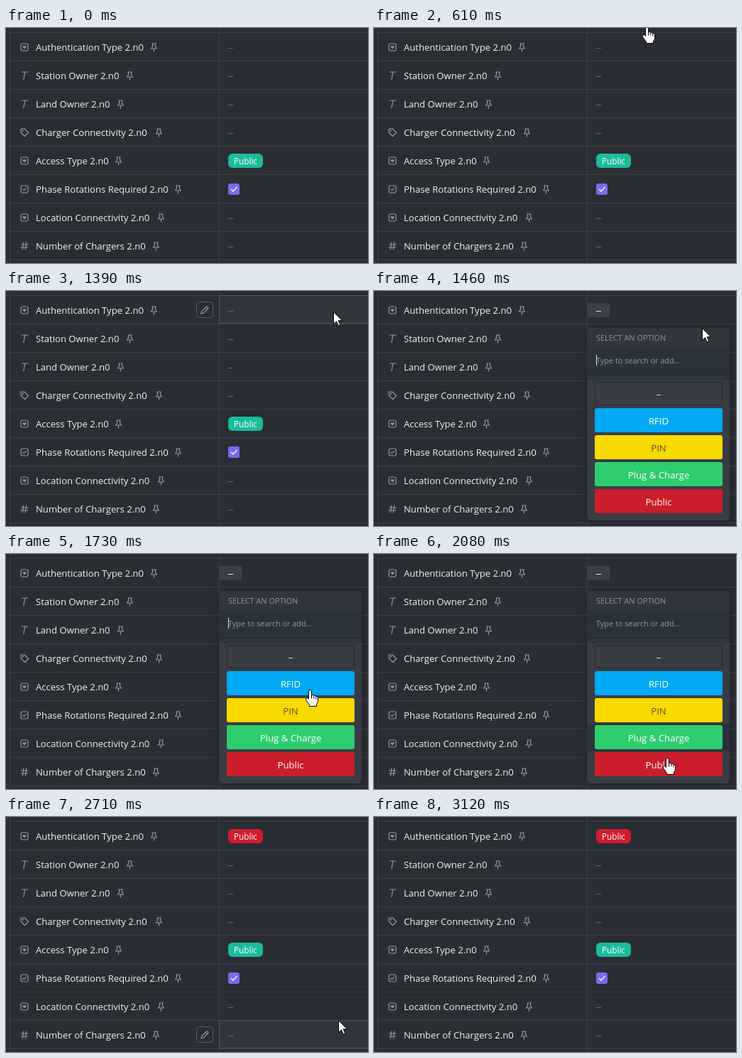
Recreate the animation shown at these times as an HTML page. Size 510 by 331 pixels, loop 4.13 s.

```html
<!DOCTYPE html>
<html lang="en">
<head>
<meta charset="utf-8">
<title>Custom fields</title>
<style>
  html, body { margin: 0; width: 100%; height: 100%; overflow: hidden; background: #2a2d34; }
  svg { display: block; font: 13.1px "Open Sans", "Noto Sans", sans-serif; }
  .line { fill: none; stroke: #979aa1; stroke-width: 1.2; stroke-linejoin: round; stroke-linecap: round; }
  .small { font-size: 10.9px; fill: #92969c; }
  .option { font-size: 13.2px; text-anchor: middle; }
  .pill { font-size: 11.7px; font-weight: 500; fill: #fff; text-anchor: middle; }
  .cursor { fill: #fff; stroke: #000; stroke-width: 1; stroke-linejoin: round; }
  .panel { filter: drop-shadow(0 1px 5px rgba(0, 0, 0, .3)); }
</style>
</head>
<body>
<svg id="stage" width="510" height="331" viewBox="0 0 510 331"></svg>
<script>
const LOOP = 4130, STEP = 70, ROW = 40, OPTION = 38;
const OPEN = 1460, CARET_OFF = 2010, BAND = 2080, PICKED = 2150, SAVED = 2290, CLOSED = 2640;

const box = '<rect x="-5" y="-5" width="10" height="10" rx="2"/>';
const icons = {
  list: box + '<path d="M-2.2 -1H2.2L0 1.7Z" fill="#979aa1"/>',
  text: '<path d="M-3.5 -5H5M.8 -5L-1.2 5.5"/>',
  tag: '<path d="M-5 -5H0L5.5 .5L.5 5.5L-5 0Z"/><circle cx="-2.3" cy="-2.3" r=".5"/>',
  check: box + '<path d="M-2.4 .1L-.7 1.9L2.5 -1.6"/>',
  number: '<path d="M-1.3 -5L-2.7 5M2.7 -5L1.3 5M-4.5 -2H5M-5 2H4.5"/>'
};

// icon, label, pin position
const rows = [
  ['list', 'Authentication Type', 208.5],
  ['text', 'Station Owner', 174.5],
  ['text', 'Land Owner', 161.5],
  ['tag', 'Charger Connectivity', 215.5],
  ['list', 'Access Type', 158.5],
  ['check', 'Phase Rotations Required', 242.5],
  ['list', 'Location Connectivity', 218.5],
  ['number', 'Number of Chargers', 211.5]
];

const options = [
  ['–', 'none', '#e8e9eb'],
  ['RFID', '#02a9f4', '#fff'],
  ['PIN', '#f8d900', '#5a5030'],
  ['Plug &amp; Charge', '#2ecd6f', '#fff'],
  ['Public', '#cb1d2b', '#fff']
];

const rect = (x, y, w, h, fill, more = '') =>
  `<rect x="${x}" y="${y}" width="${w}" height="${h}" fill="${fill}" ${more}/>`;
const label = (x, y, text, more = 'fill="#f0f1f3"') => `<text x="${x}" y="${y}" ${more}>${text}</text>`;
const dash = (y, color) => rect(313, y + 1, 7, 1, color);
const pill = (y, color) =>
  rect(313, y - 10, 49, 20, color, 'rx="6"') + label(337.5, y + 5, 'Public', 'class="pill"');

function grid() {
  let out = rect(5, 0, 1, 331, '#3b3e45') + rect(300, 0, 1, 331, '#3b3e45');
  for (let y = 6; y < 331; y += ROW) out += rect(5, y, 505, 1, '#3b3e45');
  return out;
}

const hover = `<g id="hover">
  ${rect(300.5, 6.5, 215, 39, '#31363d', 'stroke="#51565e"')}
  ${rect(268.5, 15.5, 23, 22, 'none', 'rx="4" stroke="#555960"')}
  <path class="line" d="M275 32L275.8 28.6L282.3 22.1Q283.3 21.4 284.3 22.4T284.7 24.5L278.2 31.1ZM281 23.5L283.3 25.8"/></g>`;

function field([icon, name, pin], i) {
  const y = 27 + i * ROW;
  let value = dash(y, '#666a72');
  if (i === 0) value = `<g id="empty">${value}</g><g id="saved">${pill(y, '#cf1c2d')}</g>`;
  if (i === 4) value = pill(y, '#1bbc9c');
  if (i === 5) value = rect(313, y - 8, 16, 16, '#7b68ee', 'rx="3"') +
    `<path d="M317 ${y}l3 3l5.5 -6" fill="none" stroke="#fff" stroke-width="1.5"/>`;
  return `<g class="line" transform="translate(26 ${y})">${icons[icon]}</g>
    ${label(42, y + 5, name + ' 2.n0')}
    <path class="line" transform="translate(${pin} ${y})" d="M-2.5 -5H2.5M-2 -5V-1L-4 2H4L2 -1V-5M0 2V6"/>
    ${value}`;
}

function option([text, fill, color], i) {
  const y = 127 + i * OPTION;
  const button = fill === 'none'
    ? rect(311.5, y + 1.5, 179, 32, fill, 'rx="3" stroke="#23272c"')
    : rect(311, y, 180, 34, fill, `rx="3" id="option${i}"`);
  return button + label(401, y + 23, text, `class="option" fill="${color}"`);
}

const popup = `<g id="editing">${rect(301, 17, 31, 20, '#3b4047')}${dash(27, '#e4e5e8')}</g>
  <g id="popup">
  ${rect(301, 52, 200, 271, '#383d44', 'rx="5" class="panel"')}
  <path d="M301 80V57Q301 52 306 52H496Q501 52 501 57V80Z" fill="#31353c"/>
  ${rect(301, 80, 200, 38, '#2b333a')}
  ${rect(301, 118, 200, 8, '#30363d')}
  ${rect(301, 118, 200, 1, '#23282e')}
  ${label(313, 70, 'SELECT AN OPTION', 'class="small"')}
  ${label(313, 102, 'Type to search or add...', 'class="small"')}
  ${rect(313, 90, 1, 15, '#e8e9eb', 'id="caret"')}
  ${rect(301, 125, 200, 39, '#2c323a', 'id="band"')}
  ${options.map(option).join('')}</g>`;

const cursors = `<path id="arrow" class="cursor" d="M0 0V17L4 13.2L6.8 19.3L9.4 18.2L6.7 12.2H12Z"/>
  <g id="hand" class="cursor"><path d="M-2 2Q-2 0 0 0T2 2V7Q5 6 5.3 8Q8 7 8.3 9Q11 8.5 11 11V15Q11 18 9 20V23H-1V21Q-4 17 -6 14Q-6.5 11 -4 11Q-3 11 -2 13Z"/>
  <path d="M2 7V12M5.3 8V12M8.3 9V13" fill="none"/></g>`;

stage.innerHTML = grid() + hover + rows.map(field).join('') + popup + cursors;
const el = id => document.getElementById(id);
const show = (id, on) => { el(id).style.display = on ? '' : 'none'; };
const move = (id, x, y) => el(id).setAttribute('transform', `translate(${x} ${y})`);

// pointer path: time, x, y
const path = [
  [0, 455, -40], [329, 455, -40],
  [330, 455, 304], [400, 440, 215], [470, 415, 110], [540, 393, 30], [610, 384, -2], [750, 382, -16], [820, 382, -40],
  [1035, 425, -40], [1040, 425, 1], [1390, 461, 29], [1530, 462, 74],
  [1590, 453, 115], [1730, 428, 191], [2080, 413, 287],
  [2360, 414, 288], [2570, 457, 276], [2640, 466, 279],
  [2850, 472, 300], [3049, 472, 300], [3050, 474, 312], [3119, 474, 312], [3120, 474, 400], [LOOP, 474, 400]
];
const moves = [0, 330, 1040, 1590, 2150, 2710, 3050];

// The pointer advances in discrete steps from the start of each move.
function pointer(t) {
  const start = moves.filter(m => m <= t).pop();
  const q = start + Math.floor((t - start) / STEP) * STEP;
  const i = path.findIndex(key => key[0] > q);
  const [t0, x0, y0] = path[i - 1], [t1, x1, y1] = path[i];
  const k = (q - t0) / (t1 - t0);
  return [x0 + (x1 - x0) * k, y0 + (y1 - y0) * k];
}

function render(t) {
  const [x, y] = pointer(t);
  const open = t >= OPEN && t < CLOSED, saved = t >= SAVED, picked = t >= PICKED;
  const gap = (y - 126) % OPTION;
  const hand = y < 0 || (open && y > 126 && gap > 1 && gap < 35);
  const row = Math.floor((y - 6) / ROW);

  show('popup', open);
  show('editing', open && !saved);
  show('empty', !open && !saved);
  show('saved', saved);
  show('caret', t < CARET_OFF);
  show('band', t >= BAND);
  move('band', 0, (picked ? 4 : 3) * OPTION);
  el('option4').setAttribute('fill', picked ? '#b41926' : '#cb1d2b');

  show('hover', !open && row >= 0 && row < rows.length);
  move('hover', 0, row * ROW);
  show('hand', hand);
  show('arrow', !hand);
  move(hand ? 'hand' : 'arrow', Math.round(x) + .5, Math.round(y) + .5);
}

function tick() {
  render(performance.now() % LOOP);
  requestAnimationFrame(tick);
}
tick();
</script>
</body>
</html>
```
